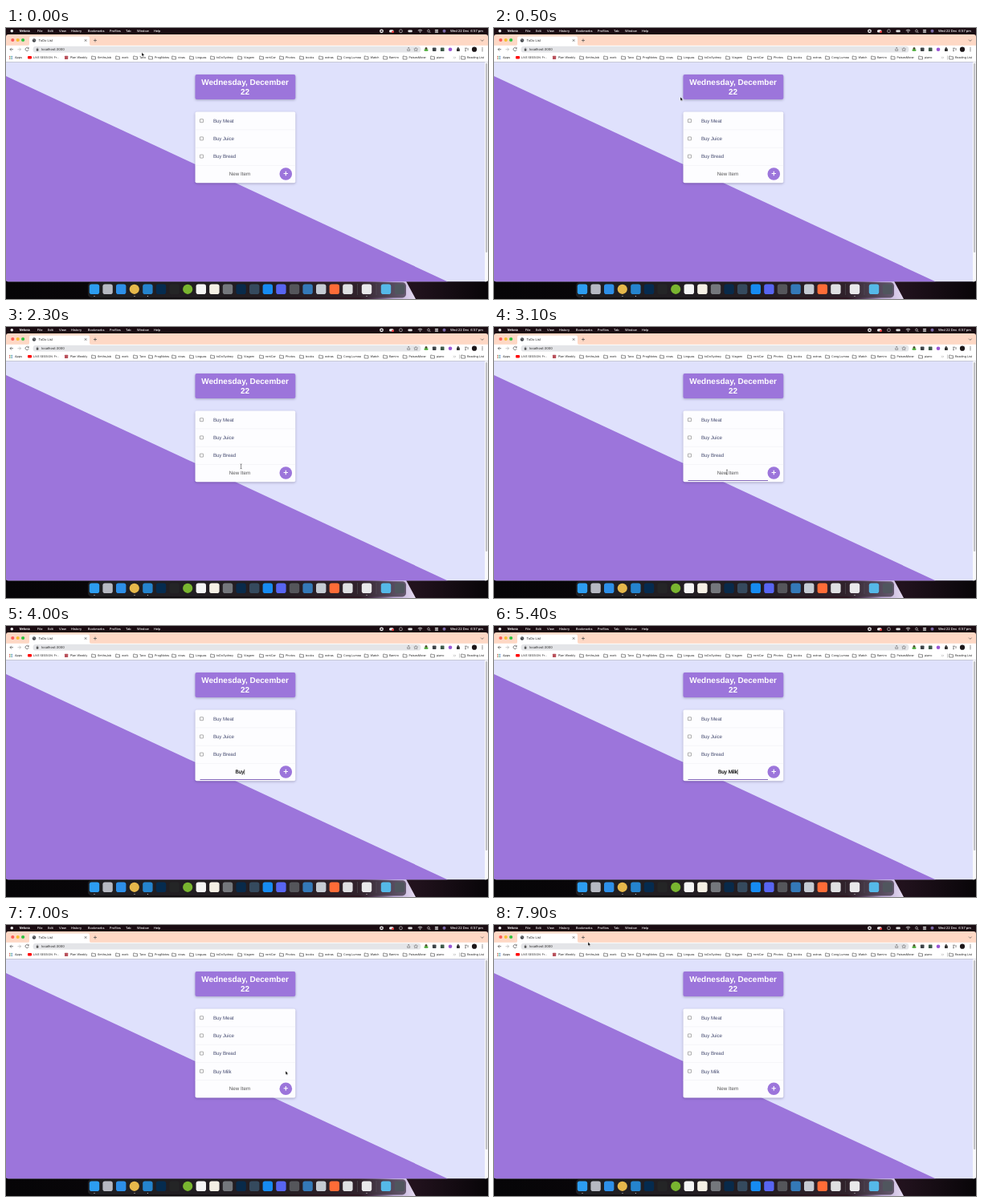
Animation of 600x338 px, one loop 8000 ms. Source, as an HTML page:

```html
<!DOCTYPE html>
<html lang="en">
<head>
<meta charset="utf-8">
<title>ToDo List</title>
<style>
html, body { margin: 0; width: 100%; height: 100%; overflow: hidden; background: #000; }
svg { display: block; width: 100%; height: 100%; font-family: Inter, "Open Sans", sans-serif; text-rendering: geometricPrecision; }
.page { font-family: "Liberation Sans", Arial, sans-serif; }
.card { filter: drop-shadow(0 1px 1.5px rgba(30, 20, 70, .3)); }
#items text { letter-spacing: -.1px; }
</style>
</head>
<body>
<svg id="stage" viewBox="0 0 600 338">
  <defs>
    <linearGradient id="desk">
      <stop offset="0" stop-color="#060507"/><stop offset=".5" stop-color="#0c070b"/>
      <stop offset=".7" stop-color="#2a0d18"/><stop offset=".85" stop-color="#21121d"/>
      <stop offset="1" stop-color="#080508"/>
    </linearGradient>
    <linearGradient id="glow">
      <stop offset="0" stop-color="#5b4370" stop-opacity="0"/><stop offset=".6" stop-color="#b7a4d2"/>
      <stop offset="1" stop-color="#e6dcf2"/>
    </linearGradient>
    <linearGradient id="shelf">
      <stop offset="0" stop-color="#1f1f22"/><stop offset=".6" stop-color="#241d22"/>
      <stop offset=".85" stop-color="#30222b"/><stop offset="1" stop-color="#65596f"/>
    </linearGradient>
    <clipPath id="window"><rect y="8" width="600" height="308.5" rx="3"/></clipPath>
  </defs>
  <g id="desktop"></g>
  <g clip-path="url(#window)">
    <g id="browser"></g>
    <g class="page">
      <rect y="42.5" width="600" height="274" fill="#dfe1fc"/>
      <path d="M0 60L550 316.5H0Z" fill="#9c75db"/>
      <path d="M596 42.5h4v274h-4z" fill="#f8f8fa"/>
      <rect x="597" y="44" width="2.2" height="236" rx="1.1" fill="#c0c0c5"/>
      <rect class="card" x="235.5" y="58" width="124.8" height="31" rx="2" fill="#9c75db"/>
      <g font-size="10" font-weight="700" fill="#fff" text-anchor="middle">
        <text x="297.6" y="71.2">Wednesday, December</text><text x="297.6" y="83.2">22</text>
      </g>
      <rect id="list" class="card" x="235.5" y="104.6" width="124.8" height="88.6" rx="2" fill="#fdfdff"/>
      <g id="items"></g>
      <g id="form">
        <path id="line" d="M241.5 191.5H341" stroke="#8467ba"/>
        <text id="field" x="291" y="184.2" font-size="6.3" stroke-width=".18" text-anchor="middle"></text>
        <path id="caret" stroke="#111" stroke-width=".6"/>
        <circle cx="348.3" cy="182" r="7.8" fill="#9c75db"/>
        <path d="M345.6 181.5h5.4M348.3 178.8v5.4" stroke="#fff" stroke-width="1.1"/>
      </g>
    </g>
  </g>
  <g id="dock"></g>
  <path id="arrow" d="M0 0V4.7L1.1 3.7L1.8 5.2L2.6 4.9L1.9 3.4H3.4Z" fill="#000" stroke="#fff" stroke-width=".4"/>
  <path id="beam" d="M-1 -3Q0 -3 0 -2.2Q0 -3 1 -3M0 -2.2V2.2M-1 3Q0 3 0 2.2Q0 3 1 3" fill="none" stroke="#333" stroke-width=".55"/>
</svg>
<script>
const LOOP = 8000, ROW = 22.2;
const FOCUS = 2550, ADD = 6850;
const $ = id => document.getElementById(id);

const rect = (x, y, w, h, fill, rx = 0) =>
  `<rect x="${x}" y="${y}" width="${w}" height="${h}" fill="${fill}" rx="${rx}"/>`;
const disc = (x, y, r, fill) => `<circle cx="${x}" cy="${y}" r="${r}" fill="${fill}"/>`;
const line = (d, color = '#444', w = .65) =>
  `<path d="${d}" fill="none" stroke="${color}" stroke-width="${w}"/>`;
const text = (x, y, s, size, fill = '#222', weight = 400) =>
  `<text x="${x}" y="${y}" font-size="${size}" fill="${fill}" font-weight="${weight}">${s}</text>`;
const folder = x => line(`M${x - 2.3} 35.1h1.7l.6 .7h2.5v3.2h-4.8z`, '#666', .75);

function menuBar() {
  const menus = [['File', 39], ['Edit', 52], ['View', 66], ['History', 81], ['Bookmarks', 102],
    ['Profiles', 129], ['Tab', 149], ['Window', 163], ['Help', 184]];
  return rect(0, 0, 600, 12, '#1a0c12') +
    disc(7.3, 3.8, 1.8, '#eee') + text(16.5, 5.3, 'Velora', 4.2, '#fff', 700) +
    menus.map(([s, x]) => text(x, 5.3, s, 3.8, '#fff', 500)).join('') +
    disc(467.5, 3.8, 2.4, '#f2f2f2') + rect(466.6, 2.9, 1.8, 1.8, '#1a0c12') +
    rect(477, 2.2, 5.6, 3.4, '#eee', 1.6) + disc(481.6, 4.8, 1.4, '#e33') +
    line('M489.6 3.8a1.9 1.9 0 1 1 3.8 0a1.9 1.9 0 1 1 -3.8 0', '#ddd') +
    rect(500.5, 2.5, 5.2, 2.7, '#ddd', .8) +
    line('M512.8 3.2q2.7 -2.2 5.4 0M514 4.4q1.5 -1.2 3 0M515.1 5.6h.8', '#eee', .8) +
    line('M526.9 4.6a1.4 1.4 0 1 1 .1 -.1l1.3 1.5', '#eee') +
    rect(533.8, 1.9, 4.4, 1.6, '#ddd', .8) + rect(533.8, 4.2, 4.4, 1.6, '#ddd', .8) +
    disc(545.5, 3.8, 2, '#7b6aa8') + text(553, 5.3, 'Wed 22 Dec&#160; 6:57 pm', 4, '#fff', 500);
}

function tabsAndToolbar() {
  const lights = ['#fc5b57', '#f7bd2e', '#2fc540'];
  return rect(0, 8, 600, 14, '#fed8c5') +
    lights.map((c, i) => disc(8.3 + i * 6.4, 15, 2.1, c)).join('') +
    '<path d="M27 22Q29 22 29 20V12.5Q29 10.5 31 10.5H102Q104 10.5 104 12.5V20Q104 22 106 22Z" fill="#fff"/>' +
    disc(35, 15.5, 2.2, '#3d4145') + line('M33.3 14.8h2l1 1.4', '#ddd', .5) +
    text(40.5, 17, 'ToDo List', 4) +
    line('M97.8 14.2l2.6 2.6m0 -2.6l-2.6 2.6M109 15.5h4m-2 -2v4M591 14.6l1.8 1.8l1.8 -1.8') +
    rect(0, 21.8, 600, 20.7, '#fff') +
    line('M9 26.7H5m1.9 -1.9L5 26.7l1.9 1.9') +
    line('M14.5 26.7h4m-1.9 -1.9l1.9 1.9l-1.9 1.9', '#aaa') +
    `<g id="reload">${line('M28 25.4a2.1 2.1 0 1 0 .2 1.8M28.2 24.2v1.6h-1.6')}</g>` +
    `<g id="stop">${line('M24.4 25l3.4 3.4m0 -3.4l-3.4 3.4')}</g>` +
    rect(33.5, 22.8, 483, 7.8, '#e4e5e8', 3.9) +
    rect(37.8, 26.2, 2.6, 2.2, '#444', .3) + line('M38.3 26.2v-.7q.8 -1.3 1.6 0v.7', '#444', .5) +
    text(44, 28.2, 'localhost:3000', 4.1) +
    line('M499.7 26v2.4h3V26M501.2 27.2v-3m-1 1l1 -1l1 1', '#555', .5) +
    line('M510.2 24.4l.7 1.5l1.7 .2l-1.2 1.1l.3 1.6l-1.5 -.8l-1.5 .8l.3 -1.6l-1.2 -1.1l1.7 -.2z', '#555', .5) +
    disc(523, 25.6, 1.5, '#4d4a2a') + rect(520.5, 26.4, 5, 2.4, '#45a832', 1) +
    rect(530.9, 24.4, 4.6, 4.6, '#3f4448', .8) +
    rect(540.9, 24.4, 4.6, 4.6, '#3e5a4a', .6) + disc(553, 26.7, 2.3, '#9a55d4') +
    rect(561, 25.4, 3.8, 3.6, '#333', .5) + disc(562.8, 25.1, 1, '#333') +
    line('M571 25.2h3m-3 1.7h2m-2 1.7h2M575 25v3') +
    disc(583, 26.7, 3.1, '#1d1719') +
    [24.8, 26.7, 28.6].map(y => disc(593, y, .6, '#444')).join('');
}

function bookmarks() {
  const marks = [['6mthsJob', 114], ['work', 144], ['Tavo', 166], ['ProgNotes', 185], ['vivas', 214],
    ['Linguas', 236], ['toDoSydney', 262], ['Viagem', 296], ['rentCar', 323], ['Photos', 348],
    ['books', 373], ['extras', 397], ['Cong.Lumea', 420], ['Watch', 453.5], ['Ramiro', 477],
    ['PaisesMorar', 501.5], ['piano', 536], ['Reading List', 574]];
  const dots = [0, 1, 2, 3, 4, 5, 6, 7, 8].map(i =>
    rect(4 + i % 3 * 1.5, 34.9 + Math.floor(i / 3) * 1.5, 1, 1, ['#d65', '#4a7', '#58c'][i % 3])).join('');
  return dots + text(11, 38.3, 'Apps', 3.7) +
    rect(27, 35, 5, 3.6, '#f00', 1) + text(34, 38.3, 'LIVE SESSION&#160; Fr...', 3.55) +
    rect(73, 34.7, 4.2, 4.2, '#b9525c', .5) + text(80, 38.3, 'Plan Weekly', 3.7) +
    marks.map(([s, x]) => folder(x - 5) + text(x, 38.3, s, 3.65)).join('') +
    line('M557 35.8l1.2 1.2l-1.2 1.2m1.6 -2.4l1.2 1.2l-1.2 1.2M564.5 34.5v5', '#777', .4) +
    rect(0, 42, 600, .5, '#dadce0');
}

const wallpaper = () => rect(0, 312, 600, 26, 'url(#desk)') +
  '<path d="M440 338V312H496L510 338Z" fill="url(#glow)"/>';

function dock() {
  const colors = ['#2c9df1', '#b6b9c2', '#2d8fe8', '#e6b84b', '#2584ce', '#052b4f', '#242526', '#79b530',
    '#f5f5f5', '#f4efe4', '#74777c', '#092a4a', '#354a5e', '#168bf2', '#5865f2', '#55565b',
    '#3479b8', '#c5cbd3', '#ff6c37', '#dfe0e2'];
  const round = [3, 7];
  const tile = (x, c) => rect(x - 6.2, 319.5, 12.4, 12.6, c, 2.8);
  const icon = (c, i) => (round.includes(i) ? disc(110 + i * 16.6, 325.8, 6.1, c) : tile(110 + i * 16.6, c));
  return rect(102, 317.2, 396, 19.2, 'url(#shelf)', 4.5) +
    colors.map(icon).join('') +
    tile(449, '#e9e9eb') + tile(473, '#55b9e8') + tile(490, '#50565e') +
    line('M437.5 319v14M461 319v14', '#56575d', .5) +
    [110, 160, 176.4, 449].map(x => disc(x, 334.5, .6, '#ddd')).join('');
}

$('desktop').innerHTML = menuBar() + wallpaper();
$('browser').innerHTML = tabsAndToolbar() + bookmarks();
$('dock').innerHTML = dock();
$('items').innerHTML = ['Meat', 'Juice', 'Bread', 'Milk'].map((s, i) => {
  const y = 115.7 + i * ROW;
  return `<g>${text(258, y + 2.2, 'Buy ' + s, 6.2, '#454b70')}
    <rect x="241.5" y="${y - 2}" width="4" height="4" rx=".3" fill="#fff" stroke="#777" stroke-width=".6"/>
    ${rect(235.5, y + 11, 124.8, .5, '#ececf2')}</g>`;
}).join('');
const newest = $('items').lastElementChild;

// Pointer stops: time, x, y
const path = [[0, 169, 30.5], [500, 232, 86], [1000, 232, 86], [1500, 300, 153], [1900, 300, 153],
  [2500, 290, 181], [5500, 290, 181], [6100, 378, 193.2], [6300, 378, 193.2], [6700, 348, 182],
  [7000, 348, 182], [7800, 117, 21.3], [8000, 117, 21.3]];
const keys = [3700, 3800, 3950, 4200, 4400, 4600, 4800, 5000];

function pointer(t) {
  const i = Math.max(1, path.findIndex(p => p[0] > t));
  const [a, x, y] = path[i - 1], [b, u, v] = path[i];
  const k = (t - a) / (b - a), e = k * k * (3 - 2 * k);
  return [x + (u - x) * e, y + (v - y) * e];
}

const show = (node, on) => node.setAttribute('visibility', on ? 'visible' : 'hidden');

function draw(t) {
  const added = t >= ADD, focused = t >= FOCUS && !added;
  const typed = added ? 0 : keys.filter(k => k <= t).length;

  show(newest, added);
  $('list').setAttribute('height', 88.6 + (added ? ROW : 0));
  $('form').setAttribute('transform', `translate(0 ${added ? ROW : 0})`);
  show($('line'), focused);

  const field = $('field');
  field.textContent = typed ? 'Buy Milk'.slice(0, typed) : 'New Item';
  field.setAttribute('fill', typed ? '#000' : '#555');
  field.setAttribute('stroke', typed ? '#000' : 'none');
  const since = t - (typed ? keys[typed - 1] : FOCUS);
  const x = typed ? 291.3 + field.getComputedTextLength() / 2 : 291;
  $('caret').setAttribute('d', `M${x} 178.8v6.6`);
  show($('caret'), focused && since % 1000 < 500);

  const loading = t >= ADD - 50 && t < ADD + 150;
  show($('reload'), !loading);
  show($('stop'), loading);

  const [px, py] = pointer(t);
  const hidden = t >= keys[0] && t < 5500;
  const overField = !added && px > 241 && px < 341 && py > 172 && py < 192;
  for (const id of ['arrow', 'beam']) {
    $(id).setAttribute('transform', `translate(${px} ${py})`);
    show($(id), !hidden && overField === (id === 'beam'));
  }
}

function tick() {
  draw(performance.now() % LOOP);
  requestAnimationFrame(tick);
}
tick();
</script>
</body>
</html>
```
